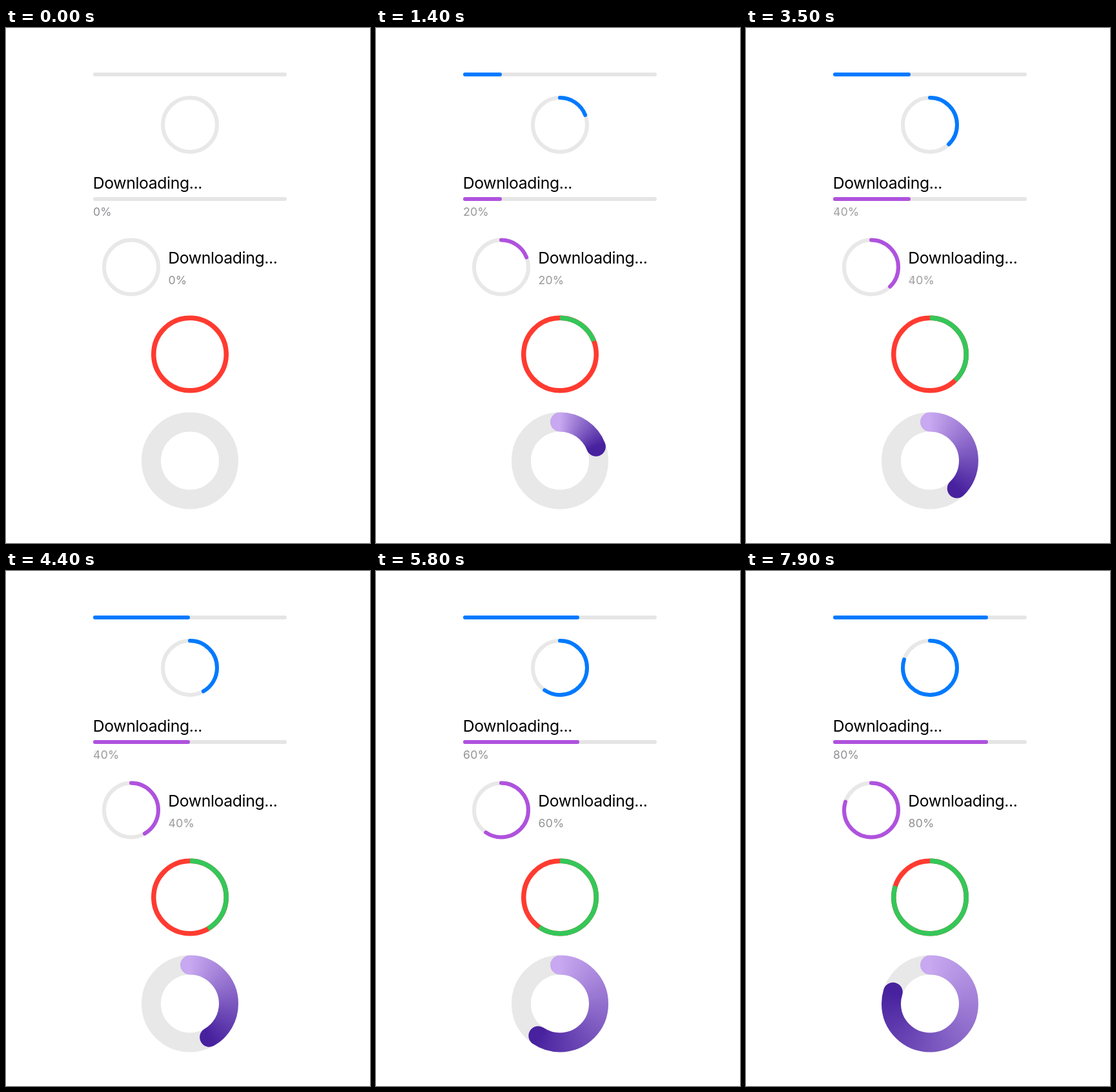
Recreate the animation shown at these times as an HTML page with a canvas. Size 564 by 798 pixels, loop 8000 ms.

```html
<!DOCTYPE html>
<html lang="en">
<head>
<meta charset="utf-8">
<title>Progress views</title>
<style>
  html, body { margin: 0; width: 564px; height: 798px; overflow: hidden; background: #fff; }
  svg, canvas { position: absolute; left: 0; top: 0; }
  .ring { fill: none; stroke-width: 6; }
  .arc { stroke-linecap: round; }
  .wide { stroke-width: 7.5; }
  text { font-family: Inter, Roboto, sans-serif; }
  .label { font-size: 24.8px; letter-spacing: -.4px; fill: #000; }
  .percent { font-size: 17.7px; letter-spacing: .2px; fill: #8e8e91; }
</style>
</head>
<body>
<canvas id="donut" width="564" height="798"></canvas>
<svg width="564" height="798" viewBox="0 0 564 798">
  <g fill="#e5e5e5">
    <rect x="135" y="69" width="300" height="6" rx="3"/>
    <rect x="135" y="262" width="300" height="6" rx="3"/>
  </g>
  <rect class="bar" x="135" y="69" height="6" rx="3" fill="#007aff"/>
  <rect class="bar" x="135" y="262" height="6" rx="3" fill="#af52de"/>

  <circle class="ring" cx="285" cy="150" r="42" stroke="#e8e8e8"/>
  <circle class="ring arc" cx="285" cy="150" r="42" stroke="#007aff" transform="rotate(-90 285 150)"/>
  <circle class="ring" cx="194" cy="370.5" r="42" stroke="#e8e8e8"/>
  <circle class="ring arc" cx="194" cy="370.5" r="42" stroke="#af52de" transform="rotate(-90 194 370.5)"/>
  <circle class="ring wide" cx="285" cy="505.5" r="56.25" stroke="#ff3b30"/>
  <circle class="ring wide arc" cx="285" cy="505.5" r="56.25" stroke="#34c759"
          style="stroke-linecap: butt" transform="rotate(-90 285 505.5)"/>

  <text class="label" x="134.8" y="249.3">Downloading...</text>
  <text class="percent old" x="135" y="291.4"></text>
  <text class="percent new" x="135" y="291.4"></text>
  <text class="label" x="251.3" y="364.8">Downloading...</text>
  <text class="percent old" x="251.5" y="396.6"></text>
  <text class="percent new" x="251.5" y="396.6"></text>
</svg>
<script>
  const LOOP = 8000, TICK = 100;
  // Each step adds ten percent: start in ms, stiffness of its spring per second
  const steps = [
    [50, 10], [1000, 10], [2000, 10], [3230, 10.5],
    [4340, 12], [5440, 13], [6470, 10.5], [7540, 17]
  ];
  const LIGHT = 'rgb(200,168,240)', DARK = 'rgb(71,33,158)';
  const all = selector => [...document.querySelectorAll(selector)];
  const bars = all('.bar'), arcs = all('.arc'), olds = all('.old'), news = all('.new');
  const ctx = document.getElementById('donut').getContext('2d');

  // Critically damped spring from 0 to 1
  const spring = x => 1 - (1 + x) * Math.exp(-x);

  function stateAt(ms) {
    const count = steps.filter(([start]) => ms >= start).length;
    if (!count) return { count, fade: 1, value: 0 };
    const [start, rate] = steps[count - 1];
    const fade = spring((ms - start) / 1000 * rate);
    return { count, fade, value: (count - 1 + fade) / 10 };
  }

  function strokeDonut(style, portion) {
    const top = -Math.PI / 2;
    ctx.beginPath();
    ctx.arc(285, 670.5, 60, top, top + portion * 2 * Math.PI);
    ctx.strokeStyle = style;
    ctx.stroke();
  }

  function drawDonut(value) {
    ctx.clearRect(0, 0, 564, 798);
    ctx.lineWidth = 30;
    ctx.lineCap = 'round';
    strokeDonut('#e8e8e8', 1);
    if (!value) return;
    const sweep = ctx.createConicGradient(-Math.PI / 2, 285, 670.5);
    const split = (1 + value) / 2;
    sweep.addColorStop(0, LIGHT);
    sweep.addColorStop(value, DARK);
    sweep.addColorStop(split, DARK);
    sweep.addColorStop(split, LIGHT);
    sweep.addColorStop(1, LIGHT);
    strokeDonut(sweep, value);
  }

  function setText(nodes, tens, opacity) {
    for (const node of nodes) {
      node.textContent = tens > 0 ? tens * 10 + '%' : '0%';
      node.style.opacity = opacity;
    }
  }

  function render(ms) {
    const { count, fade, value } = stateAt(ms);
    for (const bar of bars) bar.setAttribute('width', count * 30);
    for (const arc of arcs) {
      const length = 2 * Math.PI * arc.r.baseVal.value;
      arc.setAttribute('stroke-dasharray', `${value * length} ${length}`);
      arc.style.visibility = value ? 'visible' : 'hidden';
    }
    setText(olds, count - 1, 1 - fade);
    setText(news, count, fade);
    drawDonut(value);
  }

  // The picture advances ten times a second
  const origin = performance.now();
  function frame() {
    const ms = (performance.now() - origin) % LOOP;
    render(Math.floor(ms / TICK) * TICK);
    requestAnimationFrame(frame);
  }
  render(0);
  requestAnimationFrame(frame);
</script>
</body>
</html>
```
